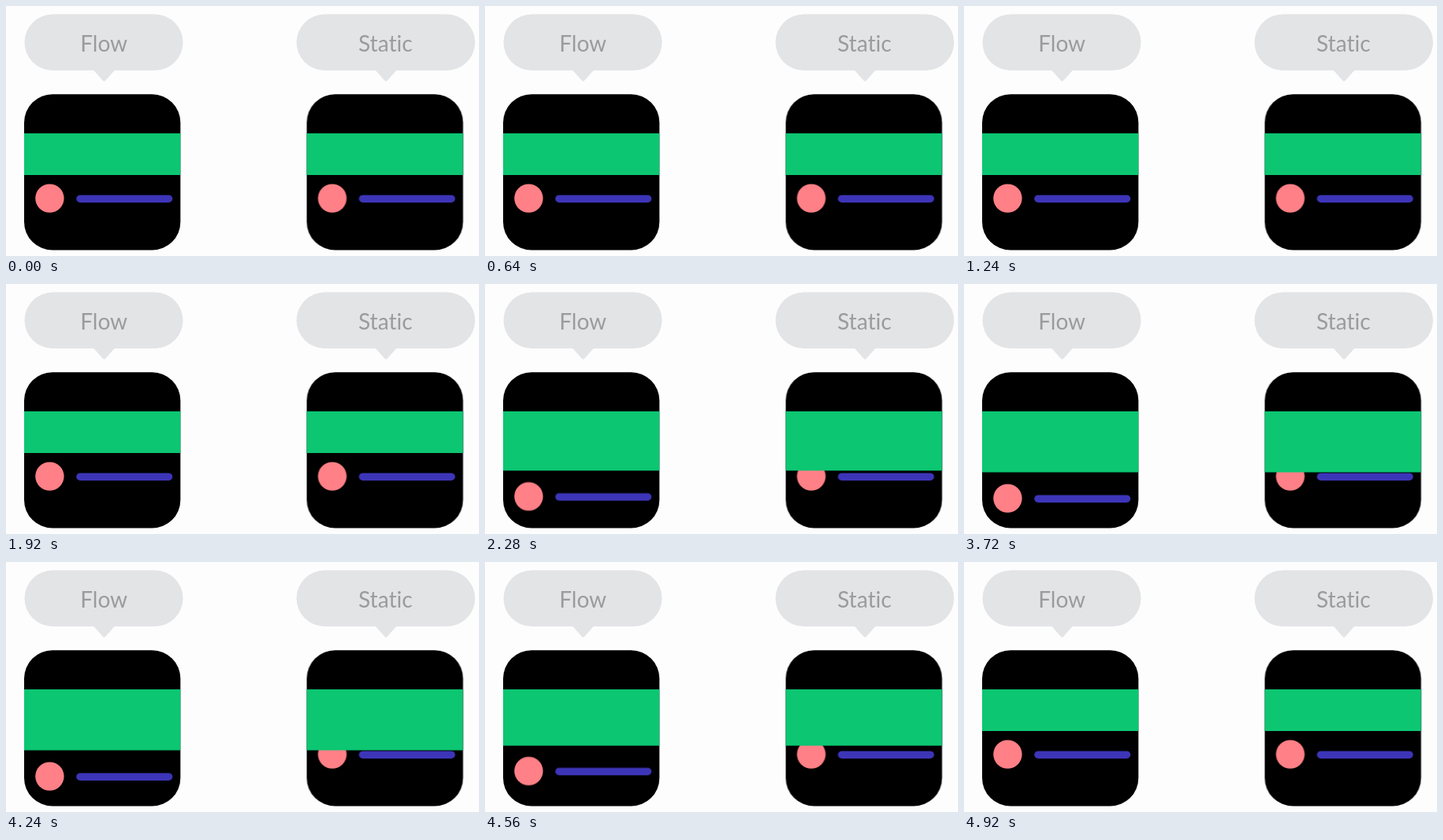
These frames come from a looping animation (600 px wide and 318 px high, 4960 ms). An HTML page:

```html
<!DOCTYPE html>
<html lang="en">
<head>
<meta charset="utf-8">
<title>Flow and Static</title>
<style>
  html, body { margin: 0; width: 100%; height: 100%; overflow: hidden; background: #fefdfe; }
  svg { display: block; width: 600px; height: 318px; }
  .bubble { fill: #e3e4e6; }
  text {
    font: 28px Lato, "Open Sans", sans-serif;
    font-variant-ligatures: none;
    fill: #9b9b9b;
    text-anchor: middle;
  }
  .band { fill: #0cc672; transform-origin: 0 162px; }
  .dot { fill: #ff8086; }
  .line { fill: #3d35b8; }
  .band, .flow .row { animation: grow 4960ms cubic-bezier(.65, 0, .35, 1) infinite; }
  .flow .row { animation-name: push; }

  @keyframes grow {
    0%, 39.52% { transform: scaleY(1); }
    48.39%, 88.47% { transform: scaleY(1.4623); }
    97.34%, 100% { transform: scaleY(1); }
  }
  @keyframes push {
    0%, 39.52% { transform: translateY(0); }
    48.39%, 88.47% { transform: translateY(28px); }
    97.34%, 100% { transform: translateY(0); }
  }
</style>
</head>
<body>
<svg viewBox="0 0 600 318">
  <defs>
    <path id="tip" class="bubble" d="M-14 81 L-2 94.5 Q0 97 2 94.5 L14 81Z"/>
  </defs>

  <rect class="bubble" x="23.5" y="10.5" width="201" height="71.5" rx="35.75"/>
  <use href="#tip" x="124.5"/>
  <text x="124.2" y="57.6">Flow</text>

  <rect class="bubble" x="368.5" y="10.5" width="226.5" height="71.5" rx="35.75"/>
  <use href="#tip" x="482"/>
  <text x="481.3" y="57.6">Static</text>

  <g class="flow" transform="translate(23 0)">
    <rect y="112.3" width="198.3" height="198.3" rx="36"/>
    <g class="row">
      <circle class="dot" cx="32.4" cy="244.6" r="18.2"/>
      <rect class="line" x="66.2" y="240.4" width="122" height="9.6" rx="4.8"/>
    </g>
    <rect class="band" y="162" width="198.3" height="53"/>
  </g>

  <g transform="translate(381.5 0)">
    <rect y="112.3" width="198.3" height="198.3" rx="36"/>
    <g class="row">
      <circle class="dot" cx="32.4" cy="244.6" r="18.2"/>
      <rect class="line" x="66.2" y="240.4" width="122" height="9.6" rx="4.8"/>
    </g>
    <rect class="band" y="162" width="198.3" height="53"/>
  </g>
</svg>
</body>
</html>
```
